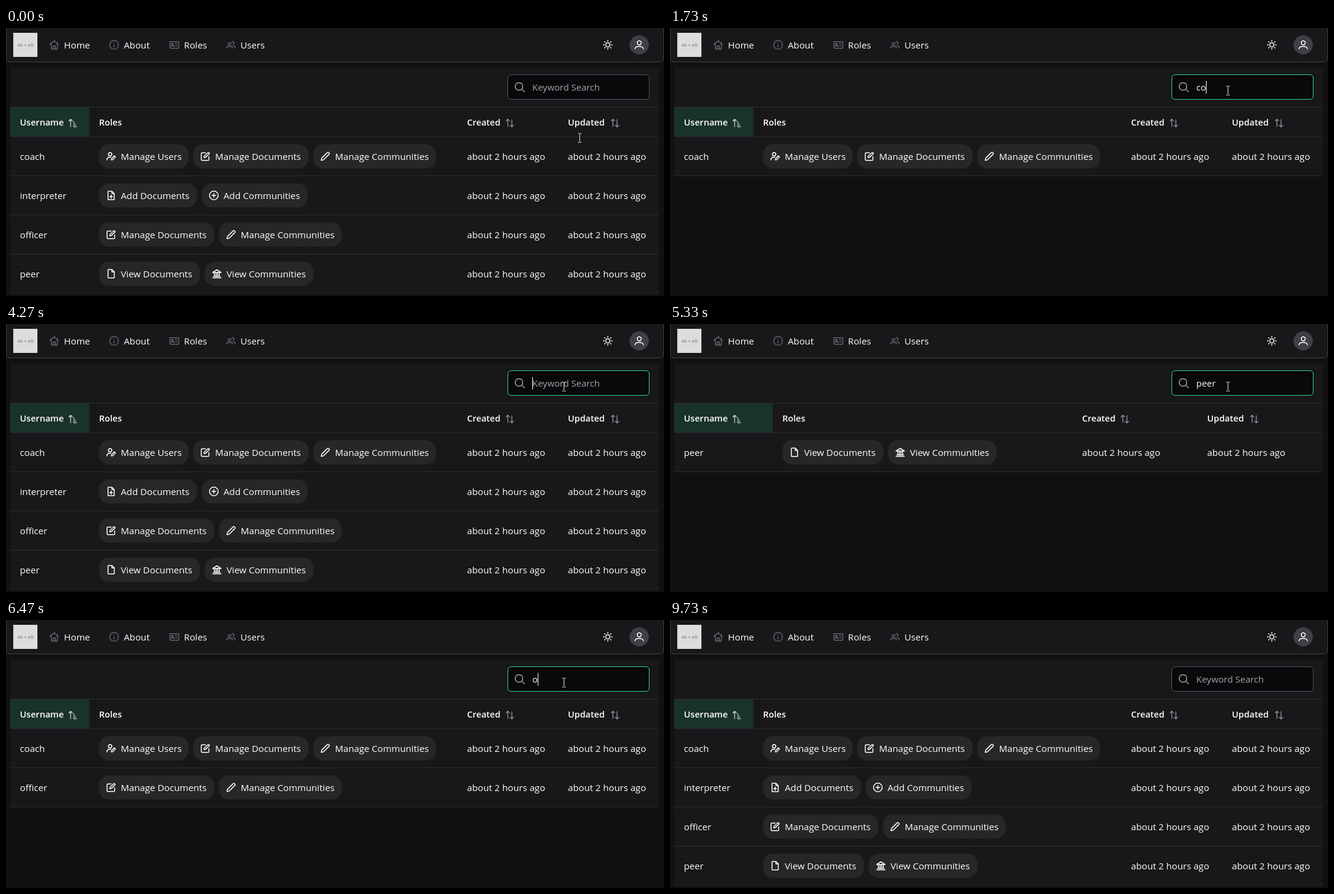
An HTML page that plays this animation: 1089 by 445 pixels, repeating every 9.94 s.

```html
<!DOCTYPE html>
<html lang="en">
<head>
<meta charset="utf-8">
<title>Keyword search in a table</title>
<style>
  html, body { margin: 0; width: 100%; height: 100%; overflow: hidden; background: #111; }
  svg { display: block; width: 1089px; height: 445px; }
  text { font: 15.2px "Open Sans", "Noto Sans", sans-serif; fill: #fff; white-space: pre; }
  .head { font-size: 14.6px; font-weight: 600; }
  .field { font-size: 15px; }
  .icon { fill: none; stroke: #fff; stroke-width: 1.5; stroke-linecap: round; stroke-linejoin: round; }
  .dim { stroke: #71717a; stroke-width: 1.25; }
  .soft { stroke: #a1a1aa; stroke-width: 1.2; }
</style>
</head>
<body>
<svg viewBox="0 0 1089 445">
  <rect width="1089" height="445" fill="#111"/>
  <rect x=".5" y="-8.5" width="1088" height="65" rx="6" fill="#18181b" stroke="#3f3f46"/>
  <rect x="12" y="8" width="40" height="40" fill="#ddd"/>
  <text x="32" y="31" text-anchor="middle" style="font:bold 8px Roboto,sans-serif;fill:#999">40 × 40</text>
  <g id="nav"></g>
  <circle cx="1048" cy="28" r="16" fill="#3f3f46"/>
  <g id="tools"></g>
  <g id="table"></g>
  <rect id="box" x="830.5" y="77.5" width="234" height="41" rx="5.5" fill="#09090b"/>
  <g class="icon" style="stroke:#a1a1aa">
    <circle cx="849" cy="97" r="6.3"/><path d="M853.7 101.7l4.3 4.3"/>
  </g>
  <text id="hint" class="field" x="871" y="104" style="fill:#a1a1aa">Keyword Search</text>
  <text id="typed" class="field" x="871" y="104"></text>
  <rect id="caret" y="88" width="1" height="21" fill="#fff"/>
  <path id="pointer" d="M-3 -7.5h2.2l.8 .8l.8 -.8h2.2M0 -6.7v13.4M-3 7.5h2.2l.8 -.8l.8 .8h2.2"
    fill="none" stroke="#e4e4e7"/>
</svg>
<script>
const LOOP = 9940;
const $ = id => document.getElementById(id);

const FILE = 'M9.3 1H4A1.2 1.2 0 0 0 2.8 2.2v11.6A1.2 1.2 0 0 0 4 15h8a1.2 1.2 0 0 0 1.2-1.2V5zM9.3 1v4h3.9';
const ring = (x, y, r) => `M${x - r} ${y}a${r} ${r} 0 1 0 ${2 * r} 0a${r} ${r} 0 1 0 ${-2 * r} 0`;
const rays = [...Array(8).keys()].map(i => {
  const c = Math.cos(i * Math.PI / 4), s = Math.sin(i * Math.PI / 4);
  return `M${8 + 6 * c} ${8 + 6 * s}L${8 + 7.4 * c} ${8 + 7.4 * s}`;
}).join('');

// Every icon is drawn in a 16 by 16 box.
const ICONS = {
  home: 'M1 7L8 1.2 15 7M3 5.5V15h10V5.5M6.3 15V9.5h3.4V15',
  info: ring(8, 8, 7.3) + 'M8 7.5v4M8 4.6v.2',
  card: 'M1.3 2.5h13.4a.6 .6 0 0 1 .6 .6v9.8a.6 .6 0 0 1-.6 .6H1.3a.6 .6 0 0 1-.6-.6V3.1a.6 .6 0 0 1 .6-.6z' +
    ring(5, 6.6, 1.3) + 'M2.8 11c0-2.4 4.4-2.4 4.4 0M9.7 6h3M9.7 9.5h3',
  group: ring(6, 6.5, 2.2) + 'M1 13.5c0-4.3 10-4.3 10 0M10 2.6a2.2 2.2 0 1 1 1.2 4.2M12.3 9.3c2 .3 3 1.4 3 3.4',
  sun: ring(8, 8, 3.5) + rays,
  person: ring(8, 4.6, 3.4) + 'M1.2 14.8v-.6c0-5 13.6-5 13.6 0v.6',
  personEdit: ring(6.3, 4.7, 2.9) + 'M1 14c0-2.8 2-4.2 5-4.2h1.2M8.3 14l.5-2.2 4.5-4.4 1.9 1.8-4.6 4.5z',
  edit: 'M8 2.3H2.3a1 1 0 0 0-1 1v10.4a1 1 0 0 0 1 1h10.4a1 1 0 0 0 1-1V8.5M5.7 10.3l.6-2.8 6.6-6.3 2 2-6.5 6.4z',
  pencil: 'M1.2 14.8l.8-3.7 9.6-9.5a1.3 1.3 0 0 1 1.9 0l.9 .9a1.3 1.3 0 0 1 0 1.9l-9.5 9.6z',
  file: FILE,
  fileAdd: FILE + 'M8 7.6v5M5.5 10.1h5',
  add: ring(8, 8, 7.2) + 'M8 4.8v6.4M4.8 8h6.4',
  bank: 'M1 6L8 1.5 15 6zM1.2 14.8h13.6M2.5 12.6h11M4 6v6.6M6.7 6v6.6M9.3 6v6.6M12 6v6.6',
  sort: 'M4.5 14V2M1.5 4.8L4.5 1.8 7.5 4.8M11.2 2.5V14.6M8.2 11.8l3 3 3-3',
  sorted: 'M4 14.5V2M1 5L4 2 7 5M8.5 6.4h1.4M8.5 9h2.7M8.5 11.7h4M8.5 14.4h5.5'
};

// Role: icon and pill width.
const ROLES = {
  'Manage Users': ['personEdit', 148],
  'Manage Documents': ['edit', 190.5],
  'Manage Communities': ['pencil', 203],
  'Add Documents': ['fileAdd', 162],
  'Add Communities': ['add', 175],
  'View Documents': ['file', 167],
  'View Communities': ['bank', 179.5]
};

const ROWS = [
  ['coach', ['Manage Users', 'Manage Documents', 'Manage Communities']],
  ['interpreter', ['Add Documents', 'Add Communities']],
  ['officer', ['Manage Documents', 'Manage Communities']],
  ['peer', ['View Documents', 'View Communities']]
];

// Text in the search field, from each time on.
const TYPING = [
  [0, ''], [1530, 'c'], [1730, 'co'], [1870, 'coa'], [2070, 'coac'], [2130, 'coach'],
  [2870, 'coac'], [3070, 'coa'], [3270, 'co'], [3400, 'c'], [3530, ''],
  [4470, 'p'], [4670, 'pe'], [4730, 'pee'], [4870, 'peer'],
  [5670, 'pee'], [5800, 'pe'], [6000, 'p'], [6130, ''],
  [6470, 'o'], [6600, 'of'], [6670, 'off'], [6800, 'offi'],
  [7670, 'off'], [7800, 'of'], [8000, 'o'], [8130, '']
];

// Times at which the caret toggles, starting hidden.
const BLINKS = [740, 1270, 1530, 2670, 3200, 3730, 4270, 5330, 5870, 6400, 6470, 7330, 7870, 8400, 8930, 9470];

const BORDERS = { idle: [82, 82, 91], hover: [113, 113, 122], focus: [52, 211, 153] };

const icon = (name, x, y, kind = '') =>
  `<path class="icon ${kind}" transform="translate(${x} ${y})" d="${ICONS[name]}"/>`;
const label = (text, x, y, kind = '') => `<text class="${kind}" x="${x}" y="${y}">${text}</text>`;
const block = (x, y, w, h, fill, r = 0) =>
  `<rect x="${x}" y="${y}" width="${w}" height="${h}" rx="${r}" fill="${fill}"/>`;
const line = y => block(7, y, 1074, 1, '#2a2a2d');

const pillsWidth = roles => roles.reduce((sum, role) => sum + ROLES[role][1] + 8, -8);

// Spare width is shared in proportion to each column's content.
function columns(rows) {
  const widths = [127, Math.max(...rows.map(r => pillsWidth(r[1]))) + 32, 162, 162];
  const scale = 1074 / widths.reduce((a, b) => a + b);
  let x = 7;
  return widths.map(w => Math.round((x += w * scale)));
}

function drawRow([name, roles], y, [rolesX, createdX, updatedX]) {
  let x = rolesX, out = label(name, 23, y + 38);
  for (const role of roles) {
    const [glyph, width] = ROLES[role];
    out += block(x, y + 12, width, 40, '#27272a', 16) +
      icon(glyph, x + 12, y + 24) + label(role, x + 36, y + 38);
    x += width + 8;
  }
  const ago = 'about 2 hours ago';
  return out + label(ago, createdX, y + 38) + label(ago, updatedX, y + 38) + line(y + 64);
}

function drawTable(query) {
  const rows = ROWS.filter(r => r[0].includes(query));
  const edges = columns(rows);
  const starts = edges.slice(0, 3).map(x => x + 16);
  const [rolesX, createdX, updatedX] = starts;
  $('table').innerHTML =
    block(7, 65, 1074, 116 + 65 * rows.length, '#18181b') +
    block(7, 131, edges[0] - 7, 50, '#19322a') + line(131) + line(180) +
    label('Username', 23, 162, 'head') + icon('sorted', 103, 149.5, 'soft" style="stroke:#d4d4d8') +
    label('Roles', rolesX, 162, 'head') +
    label('Created', createdX, 162, 'head') + icon('sort', createdX + 63, 149.5, 'soft') +
    label('Updated', updatedX, 162, 'head') + icon('sort', updatedX + 70, 149.5, 'soft') +
    rows.map((row, i) => drawRow(row, 181 + 65 * i, starts)).join('');
}

const clamp = v => Math.min(1, Math.max(0, v));
const mix = (a, b, k) => a.map((v, i) => v + (b[i] - v) * k);

function borderAt(t) {
  if (t < 670) return mix(BORDERS.idle, BORDERS.hover, clamp((t - 400) / 200));
  if (t < 9000) return mix(BORDERS.hover, BORDERS.focus, clamp((t - 670) / 200));
  return mix(BORDERS.focus, BORDERS.idle, clamp((t - 9530) / 200));
}

function pointerAt(t) {
  if (t < 8930) {
    const k = clamp((Math.floor(t / 67) * 67) / 603);
    return mix([949.5, 182.5], [923.5, 104], k * k * (3 - 2 * k));
  }
  if (t < 9000) return [926.5, 112];
  if (t < 9060) return [640.5, 260];
  return t < 9130 ? [347.5, 421] : [-20, -20];
}

let shown = null, caretX = 871;

function render(t) {
  const query = TYPING.findLast(step => step[0] <= t)[1];
  if (query !== shown) {
    shown = query;
    drawTable(query);
    $('typed').textContent = query;
    $('hint').style.display = query ? 'none' : '';
    caretX = 871 + (query ? Math.round($('typed').getComputedTextLength()) : 0);
  }
  // A keystroke at 1530 shows the caret again after the blink at 1270.
  const lit = BLINKS.filter(at => at <= t).length % 2 === 1;
  $('caret').setAttribute('x', caretX);
  $('caret').style.display = lit ? '' : 'none';
  $('box').setAttribute('stroke', `rgb(${borderAt(t).map(Math.round)})`);
  $('pointer').setAttribute('transform', `translate(${pointerAt(t)})`);
}

$('nav').innerHTML = [['home', 'Home', 72], ['info', 'About', 171], ['card', 'Roles', 270.5], ['group', 'Users', 364]]
  .map(([glyph, text, x]) => icon(glyph, x, 20, 'dim') + label(text, x + 24, 34)).join('');
$('tools').innerHTML = icon('sun', 988, 20) + icon('person', 1040, 20);

const start = performance.now();
function tick() {
  render((performance.now() - start) % LOOP);
  requestAnimationFrame(tick);
}
tick();
</script>
</body>
</html>
```
